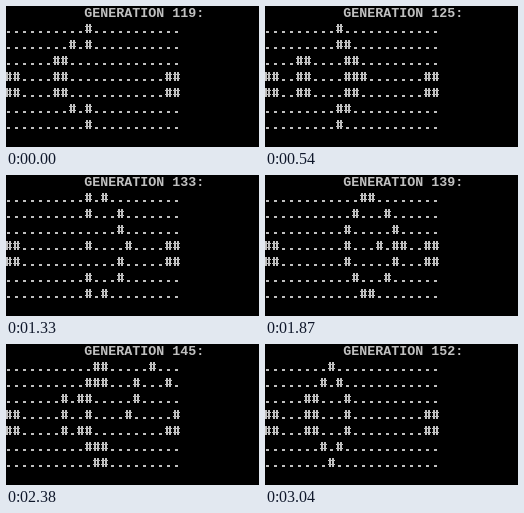
Recreate the animation shown at these times as an HTML page with a canvas. Size 253x141 px, loop 3140 ms.

```html
<!DOCTYPE html>
<html lang="en">
<head>
<meta charset="utf-8">
<title>Queen bee shuttle</title>
<style>
  html, body { margin: 0; height: 100%; overflow: hidden; background: #000; }
  canvas { display: block; width: 100vw; height: 100vh; image-rendering: pixelated; }
</style>
</head>
<body>
<canvas id="screen" width="253" height="141"></canvas>
<script>
const COLS = 22, ROWS = 7, CELL_W = 8, LINE_H = 16, LEFT = -1;
const FIRST_GENERATION = 119, GENERATION_MS = 92, LOOP_MS = 3140;

// Moments at which the console is repainted.
const REPAINTS = [0, 120, 240, 390, 540, 660, 780, 940, 1060, 1210, 1330, 1480,
  1610, 1750, 1870, 1990, 2110, 2260, 2380, 2530, 2650, 2770, 2920, 3040];

const START = [
  '..........#...........',
  '........#.#...........',
  '......##..............',
  '##....##............##',
  '##....##............##',
  '........#.#...........',
  '..........#...........',
].map(row => [...row].map(c => c === '#'));

function nextGeneration(board) {
  return board.map((row, y) => row.map((alive, x) => {
    let neighbours = 0;
    for (let dy = -1; dy <= 1; dy++)
      for (let dx = -1; dx <= 1; dx++)
        if ((dx || dy) && board[y + dy]?.[x + dx]) neighbours++;
    return neighbours === 3 || (alive && neighbours === 2);
  }));
}

const boards = [START];
while (boards.length < 34) boards.push(nextGeneration(boards.at(-1)));

const ctx = document.getElementById('screen').getContext('2d');

function drawHash(x, y) {
  for (const dx of [1, 4]) ctx.fillRect(x + dx, y + 2, 2, 9);
  for (const dy of [4, 8]) ctx.fillRect(x, y + dy, 7, 1);
}

function drawDot(x, y) {
  ctx.fillRect(x + 2, y + 9, 3, 2);
}

function draw(step) {
  ctx.fillStyle = '#000';
  ctx.fillRect(0, 0, 253, 141);
  ctx.fillStyle = '#c0c0c0';
  ctx.font = 'bold 13.333px "Liberation Mono", monospace';
  ctx.fillText(`GENERATION ${FIRST_GENERATION + step}:`, 78.3, 11);
  for (let y = 0; y < ROWS; y++)
    for (let x = 0; x < COLS; x++)
      (boards[step][y][x] ? drawHash : drawDot)(LEFT + x * CELL_W, (y + 1) * LINE_H);
}

function tick(now) {
  const t = now % LOOP_MS;
  const painted = REPAINTS.findLast(r => r <= t);
  draw(Math.floor((painted + 49) / GENERATION_MS));
  requestAnimationFrame(tick);
}
tick(performance.now());
</script>
</body>
</html>
```
